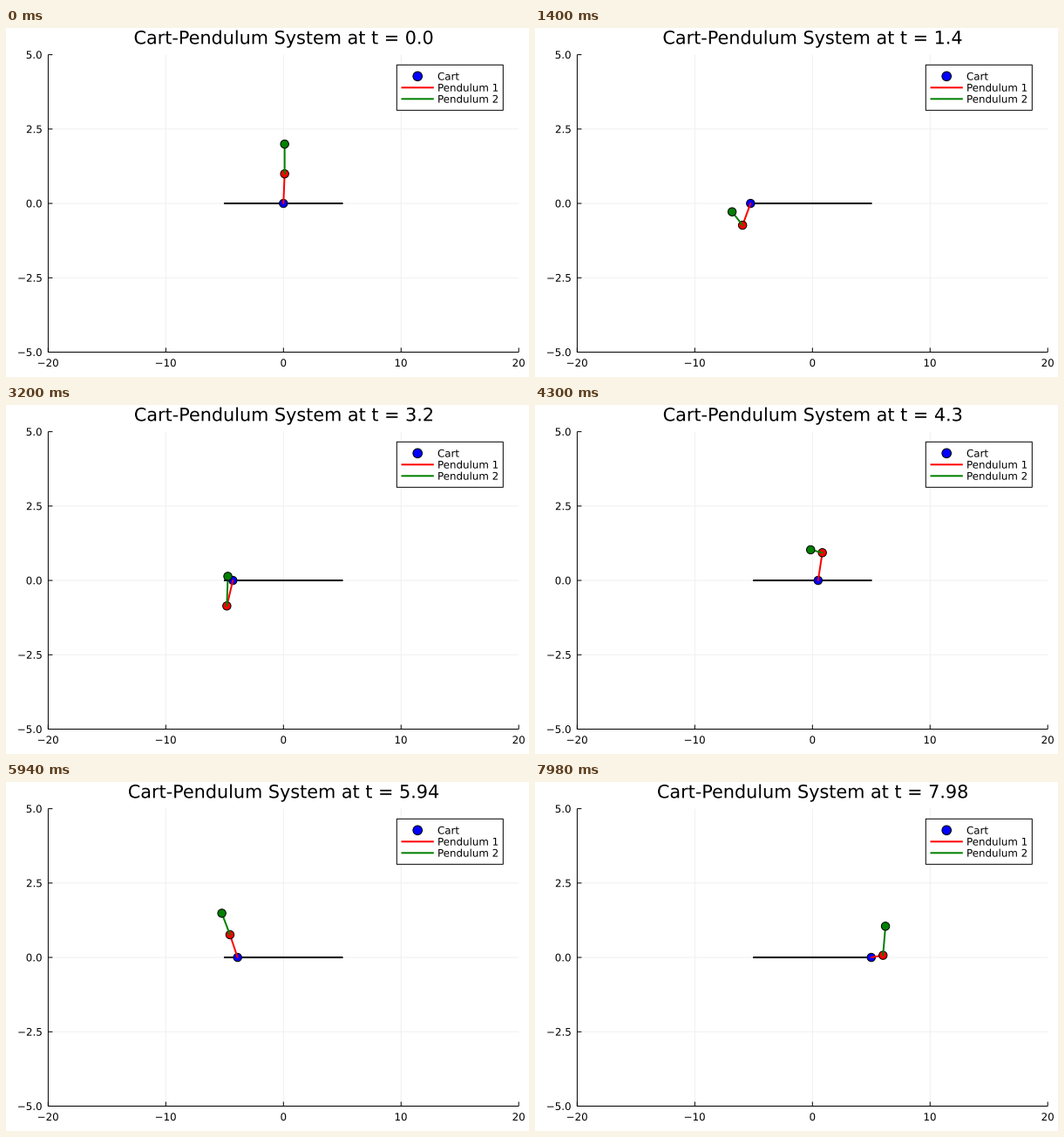
These frames come from a looping animation (600x400 px, 8 s). A matplotlib script:

```python
import numpy as np
import matplotlib.pyplot as plt
from matplotlib.animation import FuncAnimation
from matplotlib.patches import Circle, PathPatch, Rectangle
from matplotlib.path import Path
from matplotlib.textpath import TextPath

W, H, DPI = 600, 400, 100
FRAMES, STEP = 400, 20
PX = 72 / DPI                      # points per pixel
LEFT, RIGHT, TOP, BOTTOM = 48.4, 588.2, 30.6, 371.5
GRID = "#f0f0f0"

plt.rcParams["path.snap"] = False
plt.rcParams["font.family"] = "DejaVu Sans"


def to_px(x, y):
    """Data units (x -20..20, y -5..5) to stage pixels."""
    return (LEFT + (x + 20) * (RIGHT - LEFT) / 40,
            BOTTOM - (y + 5) * (BOTTOM - TOP) / 10)


# key poses: time, cart position, clockwise rod angles from upright
KEYS = np.array([
    (0.00, 0.00, 0.10, 0.00),
    (0.45, -0.25, 0.55, 0.22),
    (0.75, -1.05, 1.89, 1.43),
    (1.40, -5.26, 3.89, 5.18),
    (2.20, -7.00, 6.00, 6.55),
    (3.20, -4.30, 3.68, 6.37),
    (4.30, 0.48, 0.37, 4.81),
    (5.30, -1.85, 2.95, 3.40),
    (5.94, -3.90, 5.58, 5.52),
    (6.40, -3.70, 6.00, 6.25),
    (7.14, -0.30, 4.39, 4.85),
    (7.98, 5.00, 1.50, 0.21),
])
TIMES, POSES = KEYS[:, 0], KEYS[:, 1:]
SPEEDS = np.gradient(POSES, TIMES, axis=0)
SPEEDS[0] = 0


def state(t):
    """Cubic Hermite motion through the key poses."""
    i = min(np.searchsorted(TIMES, t, "right"), len(TIMES) - 1) - 1
    h = TIMES[i + 1] - TIMES[i]
    s = (t - TIMES[i]) / h
    return ((1 + 2 * s) * (1 - s) ** 2 * POSES[i]
            + s * (1 - s) ** 2 * h * SPEEDS[i]
            + s * s * (3 - 2 * s) * POSES[i + 1]
            + s * s * (s - 1) * h * SPEEDS[i + 1])


fig = plt.figure(figsize=(W / DPI, H / DPI), dpi=DPI, facecolor="white")
ax = fig.add_axes([0, 0, 1, 1])
ax.set_xlim(0, W)
ax.set_ylim(H, 0)
ax.axis("off")


def line(xs, ys, color="black", width=1, z=2, cap="butt"):
    return ax.plot(xs, ys, color=color, lw=width * PX, zorder=z,
                   solid_capstyle=cap)[0]


def dot(x, y, color, radius, z):
    return ax.add_patch(Circle((x, y), radius, fc=color, ec="black",
                               lw=PX, zorder=z))


def text_path(x, y, text, size, align):
    """Outline of a text with its baseline at y, aligned by its ink."""
    path = TextPath((0, 0), text, size=size)
    box = path.get_extents()
    shift = {"left": 0, "center": (box.x0 + box.x1) / 2, "right": box.x1}
    points = path.vertices * [1, -1] + [x - shift[align], y]
    return Path(points, path.codes)


def label(x, y, text, size=11.85, align="left"):
    return ax.add_patch(PathPatch(text_path(x, y, text, size, align),
                                  fc="black", lw=0, zorder=13))


def number(v):
    return str(v).replace("-", "\u2212")


# grid, ticks and axes
for v in range(-20, 21, 10):
    x, _ = to_px(v, 0)
    if abs(v) < 20:
        line([x, x], [TOP, BOTTOM], GRID, z=1)
    line([x, x], [BOTTOM, BOTTOM - 5])
    label(x, 388, number(v), align="center")
for v in np.linspace(-5, 5, 5):
    _, y = to_px(0, v)
    if abs(v) < 5:
        line([LEFT, RIGHT], [y, y], GRID, z=1)
    line([LEFT, LEFT + 5], [y, y])
    label(40.8, y + 4.4, number(float(v)), align="right")
line([LEFT, LEFT, RIGHT], [TOP, BOTTOM, BOTTOM])

# moving parts
line(*to_px(np.array([-5, 5]), np.zeros(2)), width=2, z=3, cap="round")
cart = dot(0, 0, "blue", 4.7, 4)
rod1 = line([], [], "red", 2, 5, "round")
bob1 = dot(0, 0, "red", 4.7, 6)
rod2 = line([], [], "green", 2, 7, "round")
bob2 = dot(0, 0, "green", 4.7, 8)
title = label(0, 0, "-")

# legend
ax.add_patch(Rectangle((448.3, 42.3), 122, 52, fc="white", ec="black",
                       lw=PX, zorder=11))
dot(472.2, 55.3, "blue", 5.3, 12)
for i, name in enumerate(("Cart", "Pendulum 1", "Pendulum 2")):
    y = 55.3 + 13 * i
    label(495, y + 4.3, name)
    if i:
        line([453.5, 490.8], [y, y], ("red", "green")[i - 1], 2, 12)


def update(frame):
    t = round(frame * STEP / 1000, 2)
    x, a, b = state(t)
    xs = x + np.cumsum([0, np.sin(a), np.sin(b)])
    ys = np.cumsum([0, np.cos(a), np.cos(b)])
    px, py = to_px(xs, ys)
    for part, center in zip((cart, bob1, bob2), zip(px, py)):
        part.center = center
    rod1.set_data(px[:2], py[:2])
    rod2.set_data(px[1:], py[1:])
    title.set_path(text_path(318.5, 18.3, f"Cart-Pendulum System at t = {t}",
                             20.75, "center"))
    return cart, rod1, bob1, rod2, bob2, title


anim = FuncAnimation(fig, update, frames=FRAMES, interval=STEP,
                     init_func=lambda: update(0), repeat=True,
                     repeat_delay=0, blit=False)
plt.show()
```
